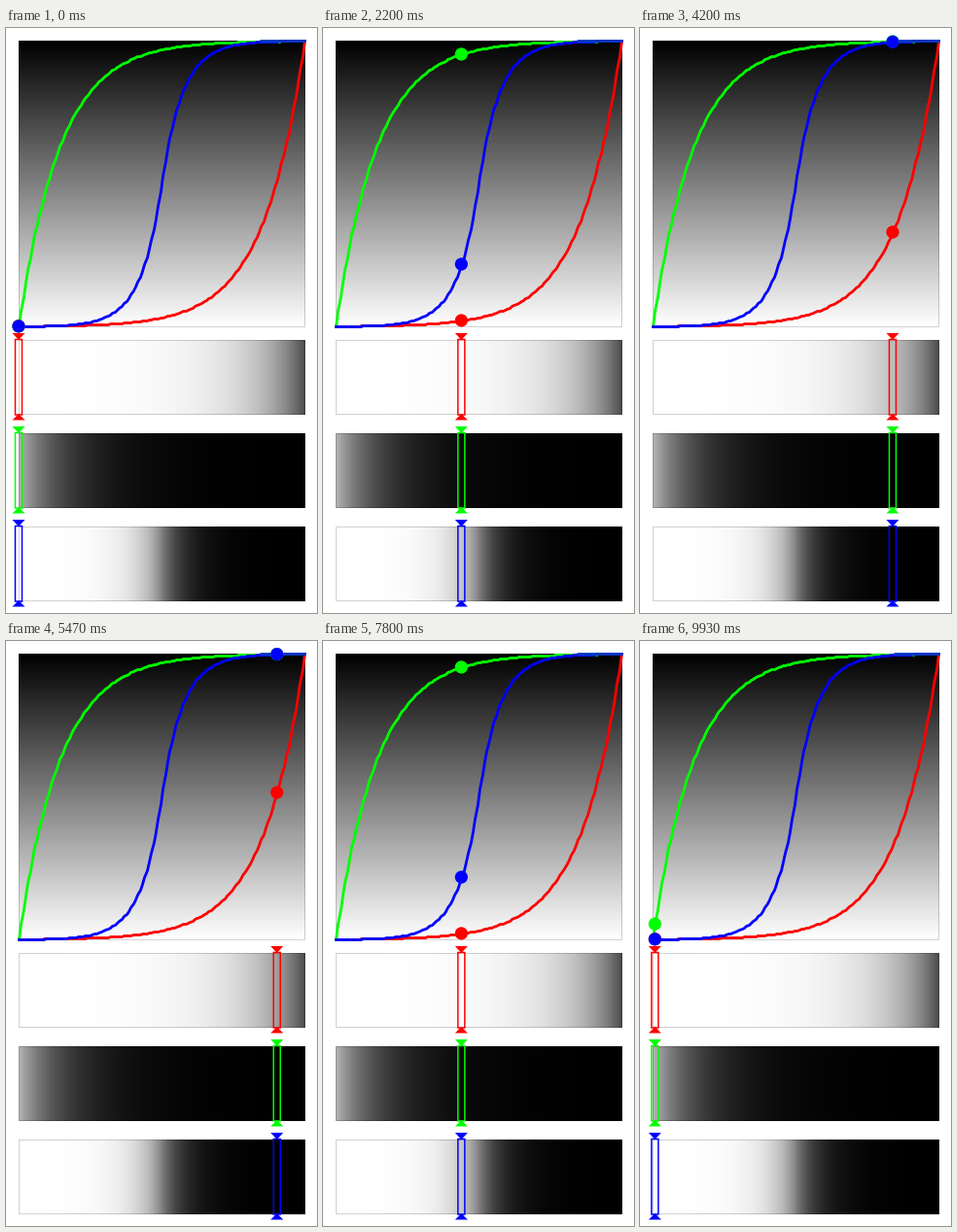
These frames come from a looping animation (320x602 px, 9990 ms). A matplotlib script:

```python
import numpy as np
import matplotlib.pyplot as plt
from matplotlib.animation import FuncAnimation
from matplotlib.patches import Circle, Polygon, Rectangle

W, H, DPI = 320, 602, 64
PX = 72 / DPI                      # one pixel in points
LEFT, TOP, SIDE = 13, 13, 294      # curve area
FRAMES, HALF = 150, 75
STEPS = 125                        # marker positions from end to end
STRIP_H, PITCH, STRIP_TOP = 77, 96, 321
RED, GREEN, BLUE = "#ff0000", "#00ff00", "#0000ff"


def ease_in(s):
    return 2.0 ** (10 * (s - 1))


def ease_out(s):
    return 1 - 2.0 ** (-10 * s)


def ease_in_out(s):
    s = np.asarray(s, dtype=float)
    return np.where(s < 0.5, 2.0 ** (20 * s - 10) / 2, 1 - 2.0 ** (10 - 20 * s) / 2)


CURVES = [(ease_in, RED), (ease_out, GREEN), (ease_in_out, BLUE)]

fig = plt.figure(figsize=(W / DPI, H / DPI), dpi=DPI, facecolor="white")
ax = fig.add_axes([0, 0, 1, 1])
ax.axis("off")
ax.set_xlim(0, W)
ax.set_ylim(H, 0)


def to_px(s, v):
    return LEFT + SIDE * s, TOP + SIDE * (1 - v)


def gray_panel(tones, top, height):
    """Fill a panel with gray tones and a translucent dark border."""
    img = np.array(np.broadcast_to(tones, (height, SIDE + 1)))
    inner = np.zeros(img.shape, dtype=bool)
    inner[1:-1, 1:-1] = True
    img[~inner] *= 0.82
    ax.imshow(img, cmap="gray", vmin=0, vmax=1, aspect="auto",
              interpolation="nearest",
              extent=(LEFT, LEFT + SIDE + 1, top + height, top), zorder=1)


class Marker:
    """A dot on the curve and a slider on the matching strip."""

    def __init__(self, ease, color, top, z):
        self.ease, self.top = ease, top
        self.dot = Circle((0, 0), 6.6, fc=color, lw=0, zorder=z)
        self.box = Rectangle((0, top - 0.5), 7, STRIP_H + 0.5, fill=False,
                             ec=color, lw=1.5 * PX, snap=False, zorder=z)
        self.tips = [Polygon(np.zeros((3, 2)), fc=color, lw=0, zorder=z)
                     for _ in range(2)]
        for patch in (self.dot, self.box, *self.tips):
            ax.add_patch(patch)

    def move(self, s):
        x, y = to_px(s, float(self.ease(s)))
        self.dot.center = x, y
        self.box.set_x(x - 3.5)
        low = self.top + STRIP_H
        for tip, base, apex in zip(self.tips, (self.top - 7, low + 5.5),
                                   (self.top, low - 1)):
            tip.set_xy([(x - 6.5, base), (x + 6.5, base), (x, apex)])


gray_panel(np.linspace(0, 1, SIDE + 1)[:, None], TOP, SIDE + 1)

across = np.linspace(0.05, 0.95, SIDE + 1)
s = np.linspace(0, 1, STEPS + 1)
markers = []
for i, (ease, color) in enumerate(CURVES):
    top = STRIP_TOP + PITCH * i
    gray_panel(1 - ease(across), top, STRIP_H)
    x, y = np.round(to_px(s, ease(s))) + 0.5
    ax.plot(x, y, color=color, lw=2.8 * PX, zorder=3 + i,
            solid_joinstyle="round", snap=False)
    markers.append(Marker(ease, color, top, 10 + i))

# Blue and green merge along the top edge.
ax.plot([263, LEFT + SIDE], [TOP + 0.5] * 2, color="#0838c0", lw=2.8 * PX,
        zorder=7, snap=False)

ax.set_xlim(0, W)
ax.set_ylim(H, 0)


def update(frame):
    step = min(frame, FRAMES - frame) * STEPS // HALF
    for marker in markers:
        marker.move(step / STEPS)
    return []


anim = FuncAnimation(fig, update, frames=FRAMES, interval=66.6,
                     repeat=True, repeat_delay=0, blit=False)
plt.show()
```
